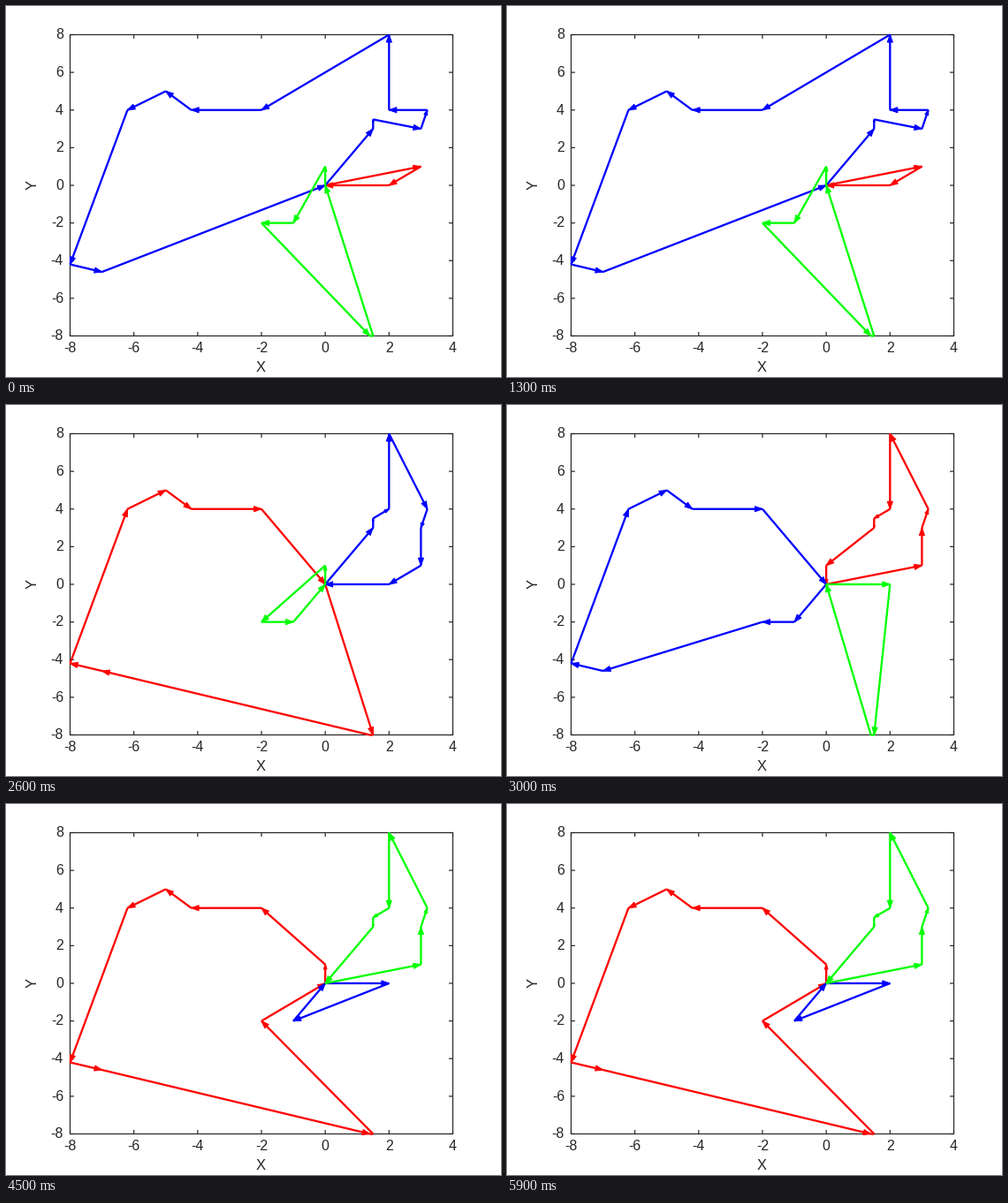
A matplotlib script for the animation above (6 s loop, 560 by 420 pixels).

```python
import numpy as np
import matplotlib.pyplot as plt
from matplotlib.animation import FuncAnimation
from matplotlib.collections import LineCollection, PolyCollection

W, H, DPI = 560, 420, 100
PX = 72 / DPI  # points per pixel
LEFT, RIGHT, TOP, BOTTOM = 72.5, 505.5, 32.5, 373.5
INK = "#262626"
FONT = "Liberation Sans"
COLORS = ["#ff0000", "#0000ff", "#00ff00"]

STOPS = {
    "0": (0, 0), "a": (1.5, 3), "b": (1.5, 3.5), "c": (2, 4), "d": (2, 8),
    "e": (3.2, 4), "f": (3, 3), "g": (3, 1), "h": (2, 0), "i": (0, 1),
    "j": (-2, 4), "k": (-4.2, 4), "l": (-5, 5), "m": (-6.2, 4),
    "n": (-8, -4.2), "o": (-7, -4.6), "p": (1.4, -8), "q": (1.5, -8),
    "r": (-2, -2), "s": (-1, -2),
}

# Red, blue and green tour of each plan; all start and end at the depot "0".
PLANS = {
    "A": ("gh", "abfecdjklmno", "isrpq"),
    "B": ("gfedjklmnopqrs", "acb", "ih"),
    "C": ("qponmlkj", "abcdefgh", "irs"),
    "D": ("ijklmnopqr", "hs", "gfedcba"),
    "E": ("gfedcbai", "sronmlkj", "hqp"),
}

# Plan on show in each 100 ms step.
ORDER = ("ACCCDDD" "EBCEDBADBC" "CEAA" "BEDAECBADE" "CABEDBEECA"
         "AAAA" "DCBABE" "DACBECCAD")


def to_px(x, y):
    return (LEFT + (x + 8) / 12 * (RIGHT - LEFT),
            BOTTOM - (y + 8) / 16 * (BOTTOM - TOP))


def head(start, tip):
    step = tip - start
    length = np.hypot(*step)
    along = step / length
    across = np.array([-along[1], along[0]])
    size = min(8.5, 0.25 * length)
    base = tip - size * along
    return [tip, base + 0.36 * size * across, base - 0.36 * size * across]


def arrows(tour):
    pts = np.array([to_px(*STOPS[s]) for s in "0" + tour + "0"])
    edges = list(zip(pts[:-1], pts[1:]))
    return edges, [head(p, q) for p, q in edges]


fig = plt.figure(figsize=(W / DPI, H / DPI), dpi=DPI, facecolor="white")
ax = fig.add_axes([0, 0, 1, 1])
ax.set_xlim(0, W)
ax.set_ylim(H, 0)
ax.axis("off")


def rule(xs, ys):
    ax.plot(xs, ys, color=INK, lw=1.2 * PX, solid_capstyle="butt",
            snap=False, zorder=1)


def label(x, y, text, size, **kw):
    ax.text(x, y, text, family=FONT, size=size * PX, color=INK,
            va="baseline", **kw)


rule([LEFT, RIGHT, RIGHT, LEFT, LEFT], [TOP, TOP, BOTTOM, BOTTOM, TOP])
for v in range(-8, 5, 2):
    x = to_px(v, 0)[0]
    rule([x, x], [BOTTOM, BOTTOM - 4.5])
    rule([x, x], [TOP, TOP + 4.5])
    label(x, 392.3, str(v), 16, ha="center")
for v in range(-8, 9, 2):
    y = to_px(0, v)[1]
    rule([LEFT, LEFT + 4.5], [y, y])
    rule([RIGHT, RIGHT - 4.5], [y, y])
    label(65, y + 4.8, str(v), 16, ha="right")
label(288.5, 414, "X", 16.5, ha="center")
label(34.5, 203, "Y", 16.5, ha="center", rotation=90, rotation_mode="anchor")

layers = []
for i, color in enumerate(COLORS):
    lines = LineCollection([], colors=color, linewidths=2.3 * PX,
                           snap=False, zorder=2 + i)
    heads = PolyCollection([], facecolors=color, edgecolors=color,
                           linewidths=PX, joinstyle="round", snap=False,
                           zorder=2 + i)
    ax.add_collection(lines, autolim=False)
    ax.add_collection(heads, autolim=False)
    layers.append((lines, heads))


def draw(i):
    for (lines, heads), tour in zip(layers, PLANS[ORDER[i]]):
        edges, tips = arrows(tour)
        lines.set_segments(edges)
        heads.set_verts(tips)
    return [part for layer in layers for part in layer]


anim = FuncAnimation(fig, draw, frames=len(ORDER), interval=100,
                     repeat=True, repeat_delay=0)
plt.show()
```
